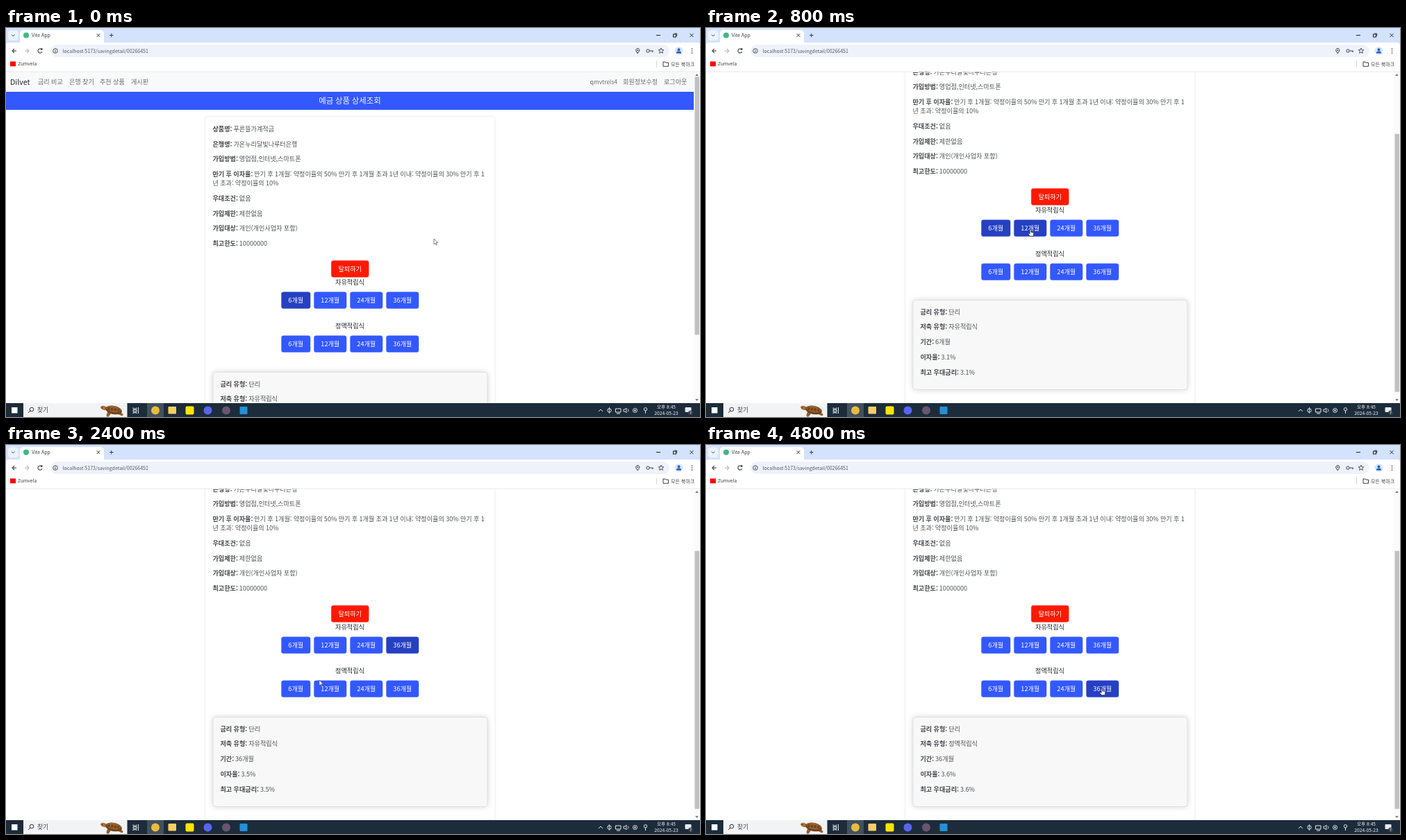
An HTML page with a canvas that plays this animation: 999x561 px, repeating every 4.88 s.

```html
<!DOCTYPE html>
<html lang="ko">
<head>
<meta charset="utf-8">
<title>Vite App</title>
<style>
  html, body { margin: 0; width: 100%; height: 100%; overflow: hidden; background: #fff; }
  canvas { display: block; width: 999px; height: 561px; }
</style>
</head>
<body>
<canvas id="stage" width="999" height="561"></canvas>
<script>
const ctx = document.getElementById('stage').getContext('2d');
const LOOP = 4880, STEP = 80, MAX_SCROLL = 104;
const VIEW = { top: 63, bottom: 541, right: 990 };
const BLUE = '#3358ff', BLUE_DARK = '#2540c2', RED = '#ff1900';
const INK = '#212529', TEXT = '#4c5054', LABEL = '#43474b';

// Pointer tip: time, x, y
const POINTER = [
  [0, 616, 304], [80, 616, 304], [400, 475, 381], [600, 475, 381],
  [800, 467, 290], [960, 467, 290], [1200, 521, 289], [1600, 521, 289],
  [1840, 580, 290], [2000, 580, 290], [2560, 419, 351], [2800, 419, 351],
  [3120, 464, 350], [3200, 464, 350], [3440, 516, 350], [3520, 516, 350],
  [3760, 566, 349], [4400, 566, 349], [4800, 570, 350.5], [4880, 570, 350.5]
];
const CLICKS = [
  { at: 0, row: 0, col: 0, rate: '3.1' },
  { at: 880, row: 0, col: 1, rate: '3.35' },
  { at: 1280, row: 0, col: 2, rate: '3.4' },
  { at: 1920, row: 0, col: 3, rate: '3.5' },
  { at: 2720, row: 1, col: 0, rate: '3.2' },
  { at: 3200, row: 1, col: 1, rate: '3.45' },
  { at: 3520, row: 1, col: 2, rate: '3.5' },
  { at: 3840, row: 1, col: 3, rate: '3.6' }
];
const KINDS = ['자유적립식', '정액적립식'];
const TERMS = ['6개월', '12개월', '24개월', '36개월'];
const BUTTONS = KINDS.flatMap((kind, row) => TERMS.map((label, col) => ({
  row, col, label, x: [396.5, 443.5, 495.5, 547.5][col], y: 380.8 + row * 63,
  w: col ? 46.5 : 41.5, h: 23.6
})));

const clamp = v => Math.max(0, Math.min(1, v));
const smooth = u => u * u * (3 - 2 * u);

function pointerAt(t) {
  const i = Math.max(1, POINTER.findIndex(p => p[0] > t));
  const [a, b] = [POINTER[i - 1], POINTER[i]];
  const u = smooth(clamp((t - a[0]) / (b[0] - a[0])));
  return { x: a[1] + (b[1] - a[1]) * u, y: a[2] + (b[2] - a[2]) * u };
}

// Two quick wheel notches that run into the end of the page
function scrollAt(t) {
  const u = clamp((t - 400) / 205);
  return MAX_SCROLL * (1 - (1 - u) ** 2);
}

function rect(x, y, w, h, fill, radius = 0) {
  ctx.fillStyle = fill;
  ctx.beginPath();
  ctx.roundRect(x, y, w, h, radius);
  ctx.fill();
}

function dot(x, y, r, fill) {
  ctx.fillStyle = fill;
  ctx.beginPath();
  ctx.arc(x, y, r, 0, 7);
  ctx.fill();
}

function ring(x, y, r, color, width = 1, from = 0, to = 7) {
  ctx.strokeStyle = color;
  ctx.lineWidth = width;
  ctx.beginPath();
  ctx.arc(x, y, r, from, to);
  ctx.stroke();
}

function line(points, color, width = 1) {
  ctx.strokeStyle = color;
  ctx.lineWidth = width;
  ctx.beginPath();
  for (let i = 0; i < points.length; i += 2) ctx.lineTo(points[i], points[i + 1]);
  ctx.stroke();
}

// y is the vertical centre; returns the advance width
function text(str, x, y, { size = 9.1, weight = 400, color = TEXT, align = 'left' } = {}) {
  ctx.font = `${weight} ${size}px "Noto Sans CJK KR", "Noto Sans CJK", sans-serif`;
  ctx.wordSpacing = '0.3px';
  ctx.textAlign = align;
  ctx.fillStyle = color;
  ctx.fillText(str, x, y + size * 0.36);
  return ctx.measureText(str).width;
}

function field(label, value, x, y) {
  const w = text(label + ': ', x, y, { weight: 700, color: LABEL });
  text(value, x + w - 0.5, y);
}

function card(x, y, w, h, fill, blur, shade) {
  ctx.save();
  ctx.shadowColor = shade;
  ctx.shadowBlur = blur;
  rect(x, y, w, h, fill, 4);
  ctx.restore();
}

function button(label, x, y, w, h, color) {
  rect(x, y, w, h, color, 3);
  ctx.strokeStyle = color + '60';
  ctx.lineWidth = 1.2;
  ctx.stroke();
  text(label, x + w / 2, y + h / 2 + 0.2, { color: '#fff', align: 'center' });
}

function drawHeader() {
  rect(0, 63, 990, 29, '#f8f9fa');
  text('Dilvet', 6, 78, { size: 10.6, weight: 500, color: INK });
  const grey = { color: '#6a6d70' };
  text('금리 비교', 46, 77.5, grey);
  text('은행 찾기', 91, 77.5, grey);
  text('추천 상품', 135, 77.5, grey);
  text('게시판', 180, 77.5, grey);
  text('qmvtrels4', 880, 77.5, { ...grey, size: 8.4, align: 'right' });
  text('회원정보수정', 888, 77.5, grey);
  text('로그아웃', 947, 77.5, grey);
  rect(0, 92, 990, 26, BLUE);
  text('예금 상품 상세조회', 495, 105, { size: 11.4, color: '#f4f6ff', align: 'center' });
}

function drawProduct() {
  card(287.5, 128.5, 415.5, 540, '#fff', 5, 'rgba(0,0,0,.11)');
  field('상품명', '푸른뜰가계적금', 297.5, 145.5);
  field('은행명', '가온누리달빛나루터은행', 297.5, 167.3);
  field('가입방법', '영업점,인터넷,스마트폰', 297.5, 188.8);
  field('만기 후 이자율', '만기 후 1개월: 약정이율의 50% 만기 후 1개월 초과 1년 이내: 약정이율의 30% 만기 후 1', 297.5, 210.6);
  text('년 초과: 약정이율의 10%', 297.5, 223.8);
  field('우대조건', '없음', 297.5, 245.5);
  field('가입제한', '제한없음', 297.5, 267.3);
  field('가입대상', '개인(개인사업자 포함)', 297.5, 289);
  field('최고한도', '10000000', 297.5, 310.5);
}

function drawButtons(choice, hovered) {
  button('탈퇴하기', 468.3, 335.6, 53.8, 23.7, RED);
  KINDS.forEach((kind, row) =>
    text(kind, 495, 366.3 + row * 63, { weight: 500, color: INK, align: 'center' }));
  for (const b of BUTTONS) {
    const dark = b === hovered || (b.row === choice.row && b.col === choice.col);
    button(b.label, b.x, b.y, b.w, b.h, dark ? BLUE_DARK : BLUE);
  }
}

function drawResult({ row, col, rate }) {
  card(298, 496.5, 395, 129, '#f8f8f8', 8, 'rgba(0,0,0,.18)');
  ctx.strokeStyle = '#dcdcdc';
  ctx.lineWidth = 0.8;
  ctx.stroke();
  const rows = [['금리 유형', '단리'], ['저축 유형', KINDS[row]], ['기간', TERMS[col]],
    ['이자율', rate + '%'], ['최고 우대금리', rate + '%']];
  rows.forEach(([label, value], i) => field(label, value, 308.5, 513.5 + i * 21.7));
}

function drawScrollbar(scroll) {
  rect(990, 63, 9, 478, '#fbfbfb');
  rect(991.5, 70.5 + scroll * 0.79, 6.5, 372, '#c1c1c1');
  triangle(994.5, 66, 1);
  triangle(994.5, 538, -1);
}

function triangle(x, y, dir) {
  ctx.fillStyle = '#777';
  ctx.beginPath();
  ctx.moveTo(x, y);
  ctx.lineTo(x + 2.3, y + 3 * dir);
  ctx.lineTo(x - 2.3, y + 3 * dir);
  ctx.fill();
}

function drawBrowser() {
  const ink = '#3c4043';
  rect(0, 0, 999, 30, '#d3e2fd');
  rect(3, 3.5, 14.5, 14.5, '#edf3fe', 4);
  line([8, 9.5, 10.3, 11.8, 12.6, 9.5], ink);
  rect(20, 3, 121, 20, '#fff', [5, 5, 0, 0]);
  rect(0, 21, 999, 42, '#fff', [4, 4, 0, 0]);
  dot(29, 10.5, 4, '#41b883');
  text('Vite App', 37, 11, { size: 6.9, color: ink });
  cross(133, 10.5, 2.3);
  line([149, 10.5, 154.5, 10.5], ink);
  line([151.75, 7.8, 151.75, 13.3], ink);
  line([936, 10.5, 942, 10.5], '#222');
  ctx.strokeRect(960.5, 9, 4, 4);
  line([962, 8, 965.7, 8, 965.7, 11.7], '#222', 0.8);
  cross(987, 10.5, 2.6);

  rect(64, 24, 891, 18, '#eef2fa', 9);
  arrow(12, 33, -1, ink);
  arrow(30, 33, 1, '#b5b8bb');
  ring(49, 33, 3, ink, 1.1, 0.3, 5.5);
  rect(50.3, 29.2, 2.2, 2.6, ink);
  ring(71, 33, 3.3, ink, 0.9);
  line([71, 32.3, 71, 35], ink);
  dot(71, 31.1, 0.5, ink);
  text('localhost:5173/savingdetail/00266451', 81.5, 33, { size: 7, color: '#55595d' });
  ring(909.3, 32, 2.6, ink, 1, 2.6, 6.8);
  line([907, 33.2, 909.3, 36.8, 911.6, 33.2], ink);
  dot(909.3, 32, 0.9, ink);
  ring(924, 33, 2.2, ink);
  line([926.2, 33, 931, 33, 931, 35], ink, 1.2);
  star(943, 33);
  dot(968.5, 33, 6, '#d8e6fc');
  dot(968.5, 31.2, 1.9, '#1a5fc4');
  rect(965, 33.6, 7, 3, '#1a5fc4', [2.5, 2.5, 0, 0]);
  for (let i = -1; i < 2; i++) dot(987.5, 33 + i * 2.9, 0.8, ink);

  rect(6, 48.3, 8, 7, '#f00');
  text('Zumvela', 17, 52, { size: 6.8, color: ink });
  line([936.5, 47, 936.5, 57], '#d0d8e6');
  line([946, 49, 949, 49, 950, 50, 953.5, 50, 953.5, 55.3, 946, 55.3, 946, 48.6], ink);
  text('모든 북마크', 957, 52, { size: 7, color: ink });
  line([0, 63, 999, 63], '#e2e4e8', 0.8);
}

function cross(x, y, r) {
  line([x - r, y - r, x + r, y + r], '#333');
  line([x - r, y + r, x + r, y - r], '#333');
}

function arrow(x, y, dir, color) {
  line([x - 3 * dir, y, x + 3 * dir, y], color, 1.1);
  line([x, y - 3, x + 3 * dir, y, x, y + 3], color, 1.1);
}

function star(x, y) {
  const points = [];
  for (let i = 0; i <= 10; i++) {
    const r = i % 2 ? 1.8 : 4, a = i * Math.PI / 5 - Math.PI / 2;
    points.push(x + r * Math.cos(a), y + r * Math.sin(a));
  }
  line(points, '#3c4043', 0.9);
}

function ellipse(x, y, rx, ry, fill, turn = 0) {
  ctx.fillStyle = fill;
  ctx.beginPath();
  ctx.ellipse(x, y, rx, ry, turn, 0, 7);
  ctx.fill();
}

function drawTurtle() {
  ellipse(141, 548, 5, 3, '#a9703d', 0.3);
  ellipse(148, 556, 2.5, 5, '#94602f', 0.5);
  ellipse(164, 556, 5, 2, '#94602f', 0.5);
  ellipse(155, 551, 12, 6, '#6f431f', 0.2);
  ellipse(155, 549.5, 10.5, 4.5, '#9a6430', 0.2);
  for (let i = 0; i < 4; i++) ellipse(148 + i * 4.6, 549 + i * 0.7, 1.8, 2.5, '#704520', 0.3);
  dot(138.5, 547.5, 0.7, '#2b1b10');
}

function drawTaskbar() {
  const pale = '#e6eaee';
  rect(0, 541, 999, 20, '#1c2c3b');
  rect(8, 547, 8.5, 8.5, '#fff');
  rect(25, 541, 149.5, 20, '#f2f3f4');
  ring(37, 550, 2.8, '#333');
  line([35, 552, 32, 555], '#333');
  text('찾기', 45, 551.3, { size: 8.8, color: '#444' });
  drawTurtle();

  line([183, 547.5, 183, 549, 188, 549, 188, 547.5], pale);
  ctx.strokeRect(183.2, 550.6, 4.8, 2.5);
  line([183, 556, 183, 554.8, 188, 554.8, 188, 556], pale);
  line([190.5, 547, 190.5, 556], pale);
  rect(203, 541, 24, 20, '#42515f');
  dot(215, 551.5, 6, '#e8bd3d');
  rect(233.5, 546, 11.5, 10.5, '#f6cf61', 1);
  rect(258.5, 545.5, 12, 12, '#fee500', 2);
  dot(290.5, 551.5, 6, '#5865f2');
  dot(317, 551.5, 6, '#6a5570');
  rect(336.5, 546, 11, 11, '#2390d8', 1);

  line([853, 553, 856, 550, 859, 553], pale);
  ring(868.5, 551.5, 2.7, pale);
  line([868.5, 547, 868.5, 556], pale, 0.8);
  line([877.5, 549, 885, 549, 885, 554, 877.5, 554, 877.5, 549], pale);
  line([879, 556, 884, 556], pale);
  line([889, 550, 891, 550, 893, 548, 893, 555, 891, 553, 889, 553, 889, 550], pale, 0.9);
  ring(893.2, 551.5, 2.8, pale, 0.8, -0.9, 0.9);
  ring(905.5, 551.5, 3, pale);
  dot(905.5, 551.5, 1.2, pale);
  ring(920.5, 549.8, 2.2, pale);
  line([920.5, 552, 920.5, 556], pale);
  const clock = { size: 6.7, color: '#f3f5f7', align: 'center' };
  text('오후 8:45', 950.5, 546.6, clock);
  text('2024-05-23', 950.5, 555.5, clock);
  rect(977.5, 547, 9, 7, pale, 1);
  dot(985.5, 555, 3.3, '#34424f');
  text('7', 985.5, 555, { size: 5.4, color: '#fff', align: 'center' });
}

function drawPointer({ x, y }, hand) {
  ctx.save();
  ctx.translate(x, y);
  const shape = new Path2D(hand
    ? 'M-.9 .7Q0-.6 .9 .7V4.3L4 5Q5 5.3 4.8 6.6L4.2 10.2H-.6L-3.2 6.8Q-3.2 5.3-.9 6.8Z'
    : 'M0 0V8L1.9 6.3L3.1 9L4.3 8.4L3.1 5.8H5.6Z');
  ctx.fillStyle = '#fff';
  ctx.strokeStyle = hand ? '#222' : '#4a4a4a';
  ctx.lineWidth = 0.7;
  ctx.fill(shape);
  ctx.stroke(shape);
  ctx.restore();
}

function render(t) {
  const scroll = scrollAt(t);
  const pointer = pointerAt(t);
  const choice = CLICKS.findLast(c => c.at <= t);
  const pageY = pointer.y + scroll;
  const hovered = BUTTONS.find(b => pointer.x >= b.x && pointer.x <= b.x + b.w
    && pageY >= b.y && pageY <= b.y + b.h);

  rect(0, 0, 999, 561, '#fff');
  ctx.save();
  ctx.beginPath();
  ctx.rect(0, VIEW.top, VIEW.right, VIEW.bottom - VIEW.top);
  ctx.clip();
  ctx.translate(0, -scroll);
  drawHeader();
  drawProduct();
  drawButtons(choice, hovered);
  drawResult(choice);
  ctx.restore();

  drawScrollbar(scroll);
  drawBrowser();
  drawTaskbar();
  drawPointer(pointer, Boolean(hovered));
}

function tick() {
  const t = performance.now() % LOOP;
  render(Math.floor(t / STEP) * STEP);
  requestAnimationFrame(tick);
}
tick();
</script>
</body>
</html>
```
